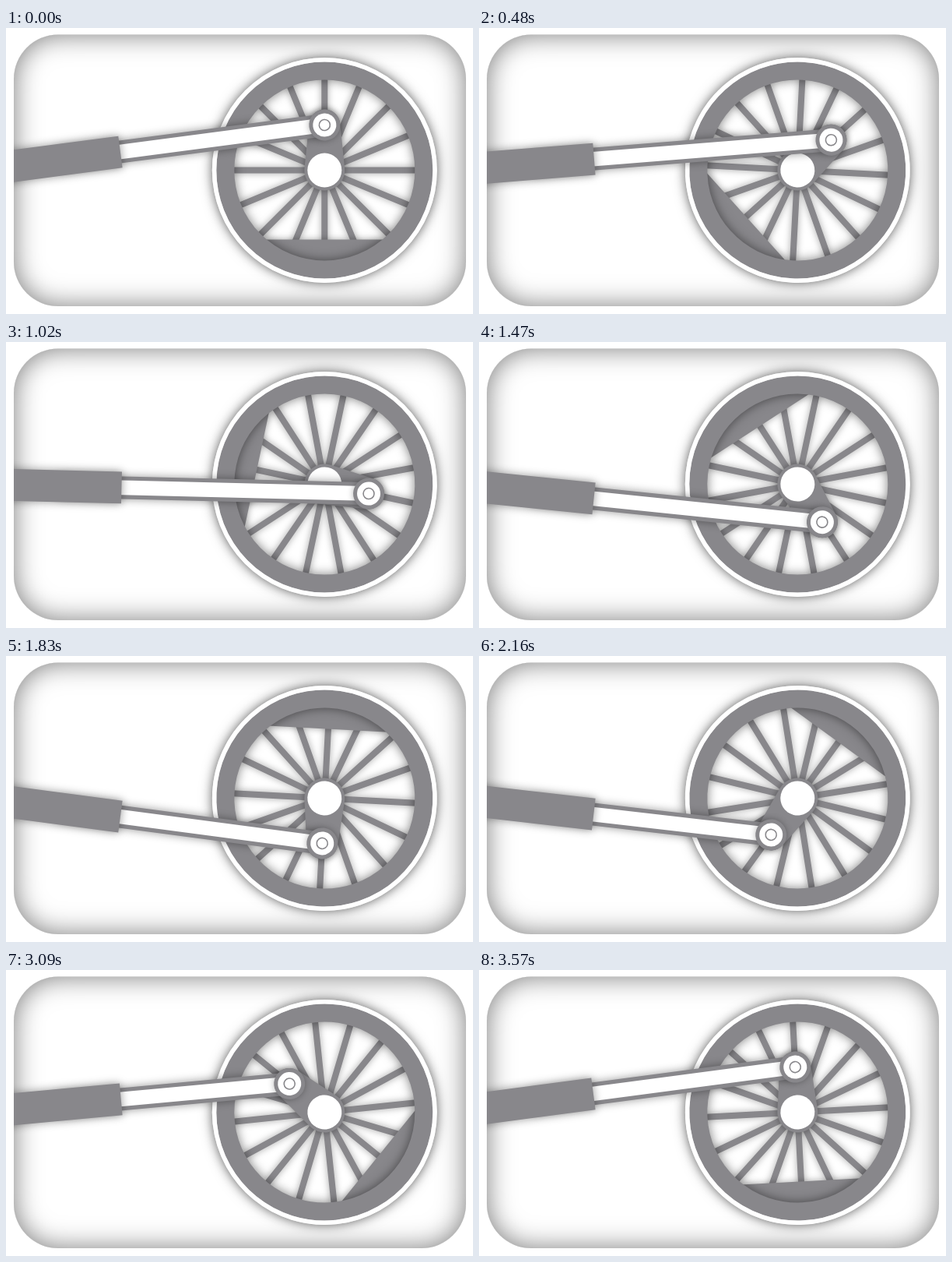
Recreate the animation shown at these times as an HTML page with a canvas. Size 600 by 367 pixels, loop 3600 ms.

```html
<!DOCTYPE html>
<html lang="en">
<head>
<meta charset="utf-8">
<title>Drive wheel</title>
<style>
  html, body { margin: 0; width: 100%; height: 100%; overflow: hidden; background: #fff; }
  canvas { display: block; }
</style>
</head>
<body>
<canvas id="stage" width="600" height="367"></canvas>
<script>
const ctx = document.getElementById('stage').getContext('2d');
const TAU = Math.PI * 2;
const GREY = '#88878b';
const LOOP = 3600, STEP = 30;
const wheel = { x: 409.3, y: 182.5, disc: 144.5, outer: 139, inner: 116, chord: 87.5 };
const pivot = { x: -32, y: 182.5 };
const CRANK = 58, HUB = 26, BOSS = 20, CYLINDER = 180.5;

function shadow(blur, alpha) {
  ctx.shadowBlur = blur;
  ctx.shadowColor = `rgba(0,0,0,${alpha})`;
}

function noShadow() {
  ctx.shadowColor = 'transparent';
}

function disc(x, y, r, color) {
  ctx.fillStyle = color;
  ctx.beginPath();
  ctx.arc(x, y, r, 0, TAU);
  ctx.fill();
}

function ring(x, y, from, to, color) {
  ctx.strokeStyle = color;
  ctx.lineWidth = to - from;
  ctx.beginPath();
  ctx.arc(x, y, (from + to) / 2, 0, TAU);
  ctx.stroke();
}

function bar(from, to, half, color) {
  ctx.fillStyle = color;
  ctx.fillRect(from, -half, to - from, half * 2);
}

function panelPath() {
  ctx.roundRect(10, 8.5, 581, 348.5, 57);
}

function drawPanel() {
  ctx.fillStyle = '#fff';
  ctx.fillRect(0, 0, 600, 367);
  ctx.beginPath();
  panelPath();
  ctx.clip();
  // The frame lies outside the clip, so only its shadow falls inwards.
  shadow(34, 0.52);
  ctx.fillStyle = '#bbb';
  ctx.beginPath();
  ctx.rect(-100, -100, 800, 567);
  panelPath();
  ctx.fill('evenodd');
  noShadow();
}

function drawSpokes() {
  ctx.strokeStyle = GREY;
  ctx.lineWidth = 8;
  ctx.beginPath();
  for (let i = 0; i < 16; i++) {
    const a = i * TAU / 16;
    ctx.moveTo(0, 0);
    ctx.lineTo(118 * Math.cos(a), 118 * Math.sin(a));
  }
  ctx.stroke();
}

function drawCounterweight() {
  const half = Math.acos(wheel.chord / wheel.inner);
  ctx.fillStyle = GREY;
  ctx.beginPath();
  ctx.arc(0, 0, wheel.inner + 2, TAU / 4 - half, TAU / 4 + half);
  ctx.closePath();
  ctx.fill();
}

// Outline tangent to both the hub and the crank pin boss.
function drawWeb() {
  const a = Math.asin((HUB - BOSS) / CRANK);
  ctx.fillStyle = GREY;
  ctx.beginPath();
  ctx.arc(0, 0, HUB, -a, Math.PI + a);
  ctx.arc(0, -CRANK, BOSS, Math.PI + a, -a);
  ctx.closePath();
  ctx.fill();
}

function drawWheel(angle) {
  ctx.save();
  ctx.translate(wheel.x, wheel.y);
  shadow(16, 0.5);
  disc(0, 0, wheel.disc, '#fff');
  ctx.rotate(angle);
  shadow(10, 0.35);
  drawSpokes();
  drawCounterweight();
  shadow(14, 0.5);
  ring(0, 0, wheel.inner, wheel.outer, GREY);
  noShadow();
  ring(0, 0, wheel.outer, wheel.disc, '#fff');
  shadow(10, 0.4);
  drawWeb();
  noShadow();
  disc(0, 0, 22, '#fff');
  ctx.restore();
}

function drawRod(angle) {
  const pinX = wheel.x + CRANK * Math.sin(angle);
  const pinY = wheel.y - CRANK * Math.cos(angle);
  const dx = pinX - pivot.x, dy = pinY - pivot.y;
  const length = Math.hypot(dx, dy);

  ctx.save();
  ctx.translate(pivot.x, pivot.y);
  ctx.rotate(Math.atan2(dy, dx));
  shadow(12, 0.4);
  bar(100, length - 6, 14.5, GREY);
  noShadow();
  bar(100, length - 6, 9.3, '#fff');
  shadow(12, 0.4);
  bar(0, CYLINDER, 20.5, GREY);
  shadow(8, 0.3);
  disc(length, 0, BOSS, GREY);
  noShadow();
  disc(length, 0, 15, '#fff');
  ring(length, 0, 6.2, 7.8, GREY);
  ctx.restore();
}

function frame(now) {
  const time = Math.floor((now % LOOP) / STEP) * STEP;
  const angle = time / LOOP * TAU;
  ctx.save();
  drawPanel();
  drawWheel(angle);
  drawRod(angle);
  ctx.restore();
  requestAnimationFrame(frame);
}

frame(0);
</script>
</body>
</html>
```
